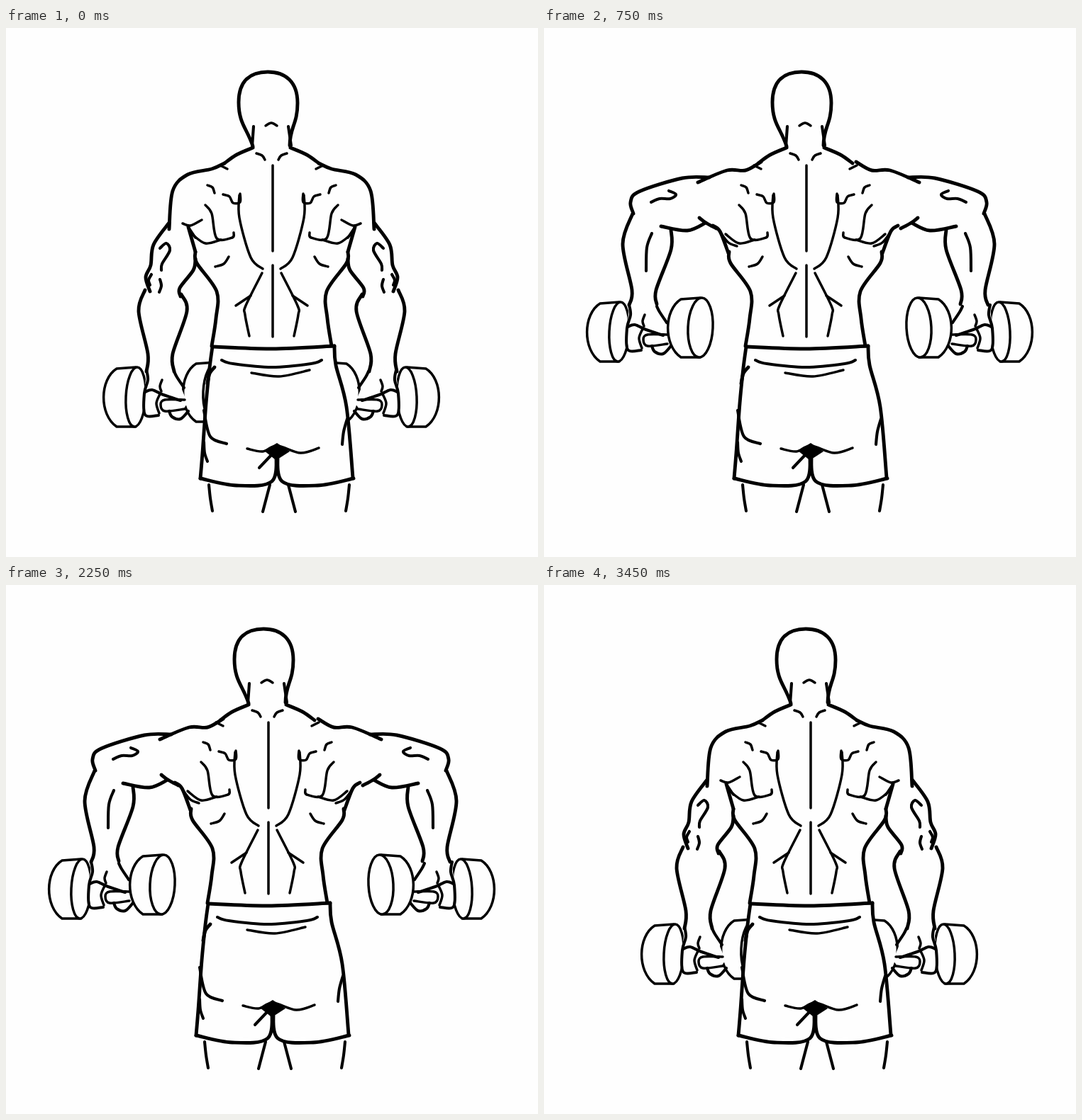
An HTML page with a canvas for the animation above (3.75 s loop, 750 px wide and 747 px high).

```html
<!DOCTYPE html>
<html lang="en">
<head>
<meta charset="utf-8">
<title>Dumbbell raise, seen from behind</title>
<style>
  html, body { margin: 0; height: 100%; overflow: hidden; background: #fefefe; }
  canvas { display: block; }
</style>
</head>
<body>
<canvas id="stage" width="750" height="747"></canvas>
<script>
const ctx = document.getElementById('stage').getContext('2d');
const PAPER = '#fefefe', INK = '#000';
const BOLD = 4.9, MEDIUM = 4.1, FINE = 3.5;
const HOLD = 750, SEQUENCE = [0, 1, 2, 1, 0];

// Smooth curve through a few "x,y" key points (Catmull-Rom as Beziers).
function curve(text) {
  const p = text.split(' ').map(s => s.split(',').map(Number));
  const path = new Path2D();
  path.moveTo(...p[0]);
  for (let i = 0; i < p.length - 1; i++) {
    const a = p[i - 1] || p[i], b = p[i], c = p[i + 1], d = p[i + 2] || c;
    path.bezierCurveTo(
      b[0] + (c[0] - a[0]) / 6, b[1] + (c[1] - a[1]) / 6,
      c[0] - (d[0] - b[0]) / 6, c[1] - (d[1] - b[1]) / 6, ...c);
  }
  return path;
}

function ink(width, ...lines) {
  ctx.lineWidth = width;
  for (const line of lines) ctx.stroke(curve(line));
}

function fillShape(color, corners) {
  ctx.fillStyle = color;
  ctx.fill(new Path2D('M' + corners));
}

function shifted(dx, dy, ...parts) {
  ctx.save();
  ctx.translate(dx, dy);
  parts.forEach(draw => draw());
  ctx.restore();
}

// Draws a left half and its mirror image around x = axis.
function both(axis, draw) {
  draw();
  ctx.save();
  ctx.translate(2 * axis, 0);
  ctx.scale(-1, 1);
  draw();
  ctx.restore();
}

function plate(x, y, width, faceRadius) {
  const height = 85, faceX = width - faceRadius;
  shifted(x, y, () => {
    const side = new Path2D(`M${faceX} 1L19 3C-5 18 -6 68 19 ${height}H${faceX}`);
    const face = new Path2D();
    face.ellipse(faceX, height / 2 + .5, faceRadius, height / 2 - .5, .05, 0, 7);
    ctx.fillStyle = PAPER;
    ctx.lineWidth = FINE;
    for (const part of [side, face]) {
      ctx.fill(part);
      ctx.stroke(part);
    }
  });
}
const outerPlate = (x, y) => plate(x, y, 60, 14);
const innerPlate = (x, y) => plate(x, y, 64, 17.5);

function hangingHand() {
  fillShape(PAPER, '199,480 238,486 256,530 240,551 197,546 194,520');
  ink(MEDIUM,
    '198,483 200,497 195,516 196,546 215,547',
    '196,514 206,511 222,518 246,526',
    '237,485 241,493 251,508',
    '230,541 234,549 246,552 257,541');
  ink(FINE,
    '219,513 217,506 220,497',
    '217,517 212,530 216,544',
    '252,525 224,525 218,532 224,541 252,538');
}

function shorts() {
  fillShape(PAPER, '291,450 463,450 482,570 489,636 380,640 274,636 282,530');
  ink(BOLD,
    '291,450 375,453 463,449',
    '291,450 287,480 282,530 277,600 274,636',
    '463,449 465,476 480,535 489,635',
    '294,479 287,488 284,502');
  both(382, () => ink(BOLD, '274,636 325,646 375,640 381,596'));
  ink(MEDIUM,
    '279,540 288,577 311,587',
    '279,585 280,600 284,612',
    '481,552 476,570 474,588',
    '304,469 320,474 375,479 430,474 445,469',
    '374,603 357,621');
  ink(FINE,
    '346,487 385,492 428,483',
    '340,594 362,598 382,590 415,600 441,593');
  fillShape(INK, '382,586 364,597 379,609 386,607 400,598');
  both(385, () => ink(MEDIUM, '286,645 288,664 291,682', '372,645 362,683'));
}

function trunk() {
  ctx.lineWidth = BOLD;
  ctx.stroke(new Path2D('M348 167C340 142 328 135 328 105C328 74 345 62 369 62' +
    'C394 62 411 76 411 106C411 136 400 140 400 166'));
  ink(MEDIUM, '349,139 347,167', '398,139 402,166');
  ink(FINE, '366,138 374,134 382,138', '376,194 376,315', '376,335 376,436');
  both(374.5, () => {
    ink(BOLD,
      '348,169 325,179 308,191',
      '267,316 269,332 297,372 296,410 290,449');
    ink(FINE,
      '353,177 361,180 365,186',
      '361,346 338,392 337,405 343,435',
      '345,378 324,392',
      '314,323 307,333 295,337');
  });
  shorts();
}

// Shoulder blades with the arms lowered.
function loweredBlades() {
  both(374.5, () => ink(FINE,
    '302,194 312,199',
    '284,222 291,225 294,233',
    '306,235 315,238 320,247 330,246 330,234',
    '329,236 329,268 345,324 362,340',
    '281,250 290,262 297,297 319,296 321,289',
    '262,291 281,304 303,299'));
}

function armsDown() {
  both(374.5, () => {
    ink(BOLD,
      '308,191 290,199 256,207 235,230 230,284',
      '230,275 208,306 204,335 197,352 203,372',
      '196,370 187,400 200,460 198,485',
      '257,281 267,316',
      '267,326 264,342 245,367 246,379',
      '247,376 255,400 235,460 237,485');
    ink(MEDIUM,
      '217,311 226,304 231,314 220,333 219,342',
      '217,355 219,364 216,373',
      '205,348 201,356 203,363');
    ink(FINE, '249,276 260,279 276,271', '257,281 267,296');
  });
}

function armsOut() {
  both(368.5, () => {
    ink(BOLD, '238,279 248,287 260,318');
    ink(FINE, '249,289 260,303 272,308');
  });
  both(373, () => {
    ink(BOLD,
      '306,189 284,201 258,201 217,218',
      '233,211 195,212 134,231 122,246 126,262',
      '125,262 111,305 124,370 120,391',
      '219,268 228,275 243,283',
      '228,275 202,286 165,280',
      '179,285 179,313 158,370 159,390');
    ink(MEDIUM,
      '151,246 163,241 178,241 186,235 176,230',
      '152,290 145,310 144,343');
  });
}

function armsUp() {
  both(375.5, () => {
    ink(BOLD,
      '312,214 303,220 262,211 222,226',
      '237,219 195,205 153,207',
      '137,126 148,155 162,188 155,206',
      '95,116 92,180 107,231 127,247',
      '127,247 170,290 249,290',
      '249,290 267,331 269,346');
    ink(MEDIUM,
      '220,253 234,275 260,287 275,299',
      '110,225 124,234',
      '160,248 189,244 203,260 202,279',
      '296,319 304,330 328,333 338,325');
    ink(FINE,
      '130,163 128,190 139,211',
      '265,324 270,332 284,335',
      '295,236 285,258 294,272',
      '271,259 287,258 322,267 336,290',
      '342,303 341,315 336,327',
      '337,333 343,349 364,369');
  });
}

function raisedHand() {
  fillShape(PAPER, '95,117 88,90 94,64 148,51 151,100 137,130');
  ink(MEDIUM,
    '95,118 87,88 94,64 115,58',
    '149,102 140,111 137,128',
    '110,68 124,53 138,50 148,51');
  ink(FINE, '131,58 128,69', '139,61 135,69');
}

const POSES = [
  () => {
    both(374, () => {
      outerPlate(137, 478);
      innerPlate(249, 471);
      hangingHand();
    });
    trunk();
    loweredBlades();
    armsDown();
  },
  () => {
    shifted(-6, 0, trunk, loweredBlades);
    both(374.5, () => {
      outerPlate(60, 386);
      shifted(-78, -92, hangingHand);
      innerPlate(174, 380);
    });
    armsOut();
  },
  () => {
    shifted(2, 28, trunk);
    both(375, () => {
      outerPlate(35, 43);
      raisedHand();
      innerPlate(148, 35);
    });
    armsUp();
  },
];

ctx.strokeStyle = INK;
ctx.lineCap = ctx.lineJoin = 'round';

function frame() {
  const step = Math.floor(performance.now() / HOLD) % SEQUENCE.length;
  ctx.fillStyle = PAPER;
  ctx.fillRect(0, 0, 750, 747);
  POSES[SEQUENCE[step]]();
  requestAnimationFrame(frame);
}
frame();
</script>
</body>
</html>
```
